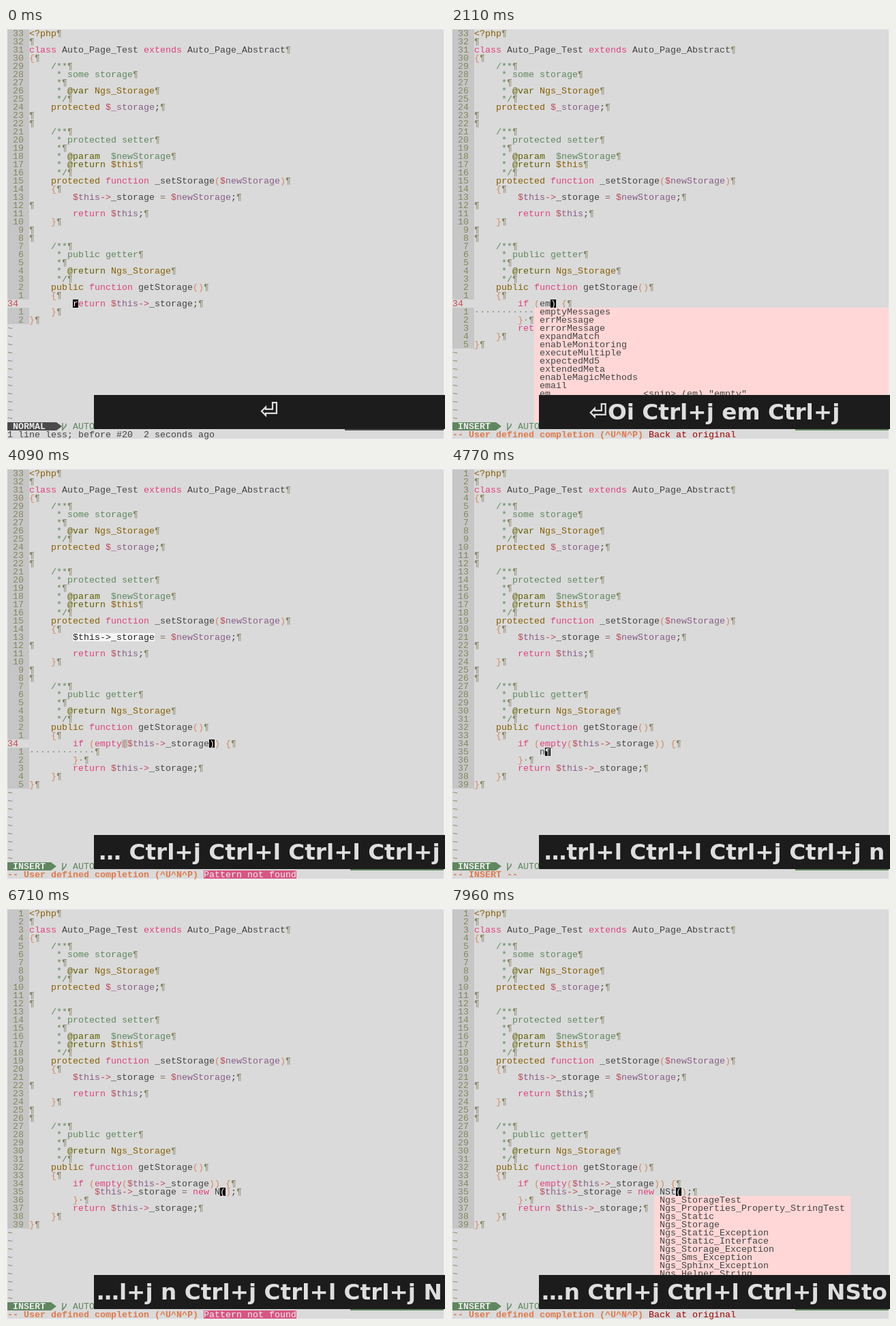
Animation of 644 by 604 pixels, one loop 8 s. Source, as an HTML page with a canvas:

```html
<!DOCTYPE html>
<html lang="en">
<head>
<meta charset="utf-8">
<title>Editor session</title>
<style>
  html, body { margin: 0; width: 100%; height: 100%; overflow: hidden; background: #eee; }
  canvas { display: block; }
</style>
</head>
<body>
<canvas id="stage" width="644" height="604"></canvas>
<script>
const ctx = document.getElementById('stage').getContext('2d');
const LOOP = 8000, CW = 8, RH = 12, PAD = 2, CODE = 4, TOP = 33;
const MONO = '13.333px "Liberation Mono", "DejaVu Sans Mono", monospace';
const KEYS = 'bold 32.7px "DejaVu Sans", sans-serif';
const C = {
  bg: '#dadada', gutter: '#c6c6c6', num: '#87875f', text: '#444',
  dim: '#87876a', comment: '#5f875f', tag: '#5f5f00', type: '#875f00', key: '#e0427f',
  name: '#875f87', op: '#c0485a', special: '#d7875f', mode: '#df7a4c', error: '#d75683',
  red: '#a00000', menu: '#ffd7d7', dark: '#4a4a4a', green: '#5f875f'
};

const head = `<?php

class Auto_Page_Test extends Auto_Page_Abstract
{
    /**
     * some storage
     *
     * @var Ngs_Storage
     */
    protected $_storage;


    /**
     * protected setter
     *
     * @param  $newStorage
     * @return $this
     */
    protected function _setStorage($newStorage)
    {
        $this->_storage = $newStorage;

        return $this;
    }


    /**
     * public getter
     *
     * @return Ngs_Storage
     */
    public function getStorage()
    {`.split('\n');
const tail = ['        return $this->_storage;', '    }', '}'];
const in8 = s => ' '.repeat(8) + s;
const in12 = s => ' '.repeat(12) + s;
const block = (cond, inner = in12('')) => [in8(`if (${cond}) {`), inner, in8('} ')];
const full = 'empty($this->_storage)';
const assign = cls => block(full, in12(`$this->_storage = new ${cls}();`));
const ngs = s => s.split(' ').map(n => 'Ngs_' + n);

const menuEm = { row: 34, col: 11, cols: 65, items: [
  ...'emptyMessages errMessage errorMessage expandMatch enableMonitoring executeMultiple expectedMd5 extendedMeta enableMagicMethods email'.split(' '),
  'em'.padEnd(19) + '<snip> (em) "empty"'] };
const menuNS = { row: 35, col: 33, cols: 23, items: ngs(
  'Sms Sphinx Static Storage StorageTest Sms_Exception Sphinx_Exception Static_Exception Static_Interface Storage_Exception') };
const menuNSt = { row: 35, col: 33, cols: 36, items: ngs(
  'StorageTest Properties_Property_StringTest Static Storage Static_Exception Static_Interface Storage_Exception Sms_Exception Sphinx_Exception Helper_String') };

// [ms, changes]; "add" appends to the shown keystrokes. Positions are [row, column, length].
const events = [
  [0, { add: '⏎', body: [], cur: [33, 8], msg: 'undo' }],
  [110, { add: 'O' }],
  [190, { body: [in8('')], insert: true, msg: 'insert' }],
  [1000, { add: 'i' }],
  [1060, { body: [in8('i')], cur: [33, 9] }],
  [1110, { msg: 'none' }],
  [1380, { add: ' Ctrl+j' }],
  [1450, { body: block(''), cur: [33, 12], msg: 'insert' }],
  [1650, { add: ' e' }],
  [1690, { body: block('e'), cur: [33, 13], msg: 'none' }],
  [1850, { add: 'm' }],
  [1900, { body: block('em'), cur: [33, 14] }],
  [1970, { menu: menuEm, msg: 'back' }],
  [2070, { add: ' Ctrl+j' }],
  [2190, { menu: null, body: block('empty()'), cur: [33, 18], paren: [33, 17], msg: 'insert' }],
  [2320, { msg: 'none' }],
  [2950, { add: ' Ctrl+l' }],
  [3040, { body: block('empty($newStorage)'), cur: [33, 29], mark: [20, 26, 11], msg: 'insert' }],
  [3230, { msg: 'none' }],
  [3400, { add: ' Ctrl+l' }],
  [3500, { body: block(full), cur: [33, 33], mark: [20, 8, 15], msg: 'insert' }],
  [3600, { msg: 'none' }],
  [4040, { add: ' Ctrl+j' }],
  [4150, { cur: [33, 34], paren: [33, 11], mark: null, msg: 'insert' }],
  [4300, { add: ' Ctrl+j' }],
  [4390, { cur: [34, 12], paren: null, absolute: true }],
  [4550, { add: ' n' }],
  [4600, { body: block(full, in12('n')), cur: [34, 13] }],
  [4810, { msg: 'none' }],
  [5080, { add: ' Ctrl+j' }],
  [5160, { body: block(full, in12(' = new ();')), cur: [34, 12] }],
  [5790, { add: ' Ctrl+l', cur: null }],
  [5900, { body: assign(''), cur: [34, 27], mark: [33, 18, 15] }],
  [6160, { add: ' Ctrl+j' }],
  [6230, { cur: [34, 34], mark: null, msg: 'insert' }],
  [6600, { add: ' N' }],
  [6660, { body: assign('N'), cur: [34, 35], msg: 'none' }],
  [6850, { add: 'S' }],
  [6920, { body: assign('NS'), cur: [34, 36] }],
  [7070, { menu: menuNS, msg: 'back' }],
  [7210, { add: 't' }],
  [7300, { body: assign('NSt'), cur: [34, 37] }],
  [7420, { menu: menuNSt }],
  [7960, { add: 'o' }]
];

function stateAt(t) {
  const s = { keys: '' };
  for (const [ms, change] of events) {
    if (ms > t) break;
    Object.assign(s, change);
    if (change.add) s.keys += change.add;
  }
  return s;
}

const px = col => PAD + col * CW;
const py = row => PAD + row * RH;

function rect(x, y, w, h, color) {
  ctx.fillStyle = color;
  ctx.fillRect(x, y, w, h);
}
function cells(row, col, n, color) {
  rect(px(col), py(row), n * CW, RH, color);
}
function put(row, col, str, color, bold) {
  ctx.font = (bold ? 'bold ' : '') + MONO;
  ctx.fillStyle = color;
  ctx.fillText(str, px(col), py(row) + 10);
}

const keywords = /^(class|extends|function|return|if|new|empty)$/;
function codeColor(tok, prev) {
  if (prev === '$') return C.name;
  if (keywords.test(tok)) return C.key;
  if (/^(<\?php|protected|public)$/.test(tok)) return C.type;
  if (/^(\$|->)$/.test(tok)) return C.op;
  if (tok === '=') return '#875f5f';
  return /^[(){}]$/.test(tok) ? C.special : C.text;
}

function drawLine(row, line) {
  const code = line.trimEnd();
  const doc = /^\s*(\/\*|\*)/.test(code);
  const tokens = code.match(doc ? /\s+|\S+/g : /<\?php|->|\s+|\w+|./g) || [];
  let col = CODE, prev = '', typed = false;
  for (const tok of tokens) {
    if (tok.trim()) {
      const color = !doc ? codeColor(tok, prev) : tok[0] === '@' ? C.tag : typed ? C.type : C.comment;
      put(row, col, tok, color);
      typed = typed || /^@(var|return)$/.test(tok);
    }
    col += tok.length;
    prev = tok;
  }
  put(row, col, '·'.repeat(line.length - code.length) + '¶', C.dim);
}

function drawNumber(row, s) {
  if (s.absolute) put(row, 1, String(row + 1).padStart(2), C.num);
  else if (row === TOP) put(row, 0, '34', '#c84a55');
  else put(row, 1, String(Math.abs(row - TOP)).padStart(2), C.num);
}

function drawText(s) {
  const lines = [...head, ...s.body, ...tail];
  rect(px(0), py(0), CODE * CW, lines.length * RH, C.gutter);
  if (!s.absolute) cells(TOP, 0, CODE, C.bg);
  if (s.paren) cells(s.paren[0], CODE + s.paren[1], 1, '#b8b8b8');
  lines.forEach((line, row) => {
    drawNumber(row, s);
    drawLine(row, line);
  });
  for (let row = lines.length; row < 48; row++) put(row, 0, '~', C.dim);

  if (s.mark) {
    const [row, col, n] = s.mark;
    cells(row, CODE + col, n, '#f6f6f6');
    put(row, CODE + col, lines[row].substr(col, n), '#222');
  }
  if (s.cur) {
    const [row, col] = s.cur;
    cells(row, CODE + col, 1, '#000');
    put(row, CODE + col, lines[row][col] || '¶', '#fff');
  }
}

function drawStatus(s) {
  const y = py(48), color = s.insert ? C.green : C.dark, end = s.insert ? 66 : 74;
  rect(PAD, y, 640, RH, C.bg);
  rect(PAD, y, end - PAD, RH, color);
  ctx.beginPath();
  ctx.moveTo(end, y);
  ctx.lineTo(end + 8, y + RH / 2);
  ctx.lineTo(end, y + RH);
  ctx.fill();
  put(48, 1, s.insert ? 'INSERT' : 'NORMAL', '#eee', true);
  // branch sign
  ctx.strokeStyle = C.green;
  ctx.lineWidth = 1.4;
  ctx.beginPath();
  ctx.moveTo(83, y + 1);
  ctx.lineTo(83, y + 11);
  ctx.lineTo(88, y + 5);
  ctx.lineTo(88, y + 2);
  ctx.stroke();
  put(48, 12, 'AUTO', C.green);
  const right = s.insert ? 505 : 497;
  rect(right, y, 642 - right, RH, color);
}

function drawMessage(msg) {
  if (msg === 'undo') return put(49, 0, '1 line less; before #20  2 seconds ago', C.text);
  if (msg === 'insert') return put(49, 0, '-- INSERT --', C.mode, true);
  put(49, 0, '-- User defined completion (^U^N^P)', C.mode, true);
  if (msg === 'back') return put(49, 36, 'Back at original', C.red);
  cells(49, 36, 17, C.error);
  put(49, 36, 'Pattern not found', '#eee');
}

function drawMenu({ row, col, cols, items }) {
  const left = CODE + col;
  rect(px(left), py(row), cols * CW, (48 - row) * RH, C.menu);
  items.forEach((item, i) => put(row + i, left + 1, item, C.text));
}

function drawKeys(keys) {
  rect(129, 538, 515, 50, '#1c1c1c');
  ctx.font = KEYS;
  ctx.fillStyle = '#dedede';
  let str = keys;
  for (let i = 1; ctx.measureText(str).width > 515; i++) str = '…' + keys.slice(i);
  ctx.textAlign = 'center';
  ctx.fillText(str, 386.5, keys.length > 1 ? 574 : 572);
  ctx.textAlign = 'left';
}

function frame(now) {
  const s = stateAt(now % LOOP);
  rect(0, 0, 644, 604, '#eee');
  rect(PAD, PAD, 640, 600, C.bg);
  drawText(s);
  drawStatus(s);
  drawMessage(s.msg);
  if (s.menu) drawMenu(s.menu);
  drawKeys(s.keys);
  requestAnimationFrame(frame);
}
requestAnimationFrame(frame);
</script>
</body>
</html>
```
